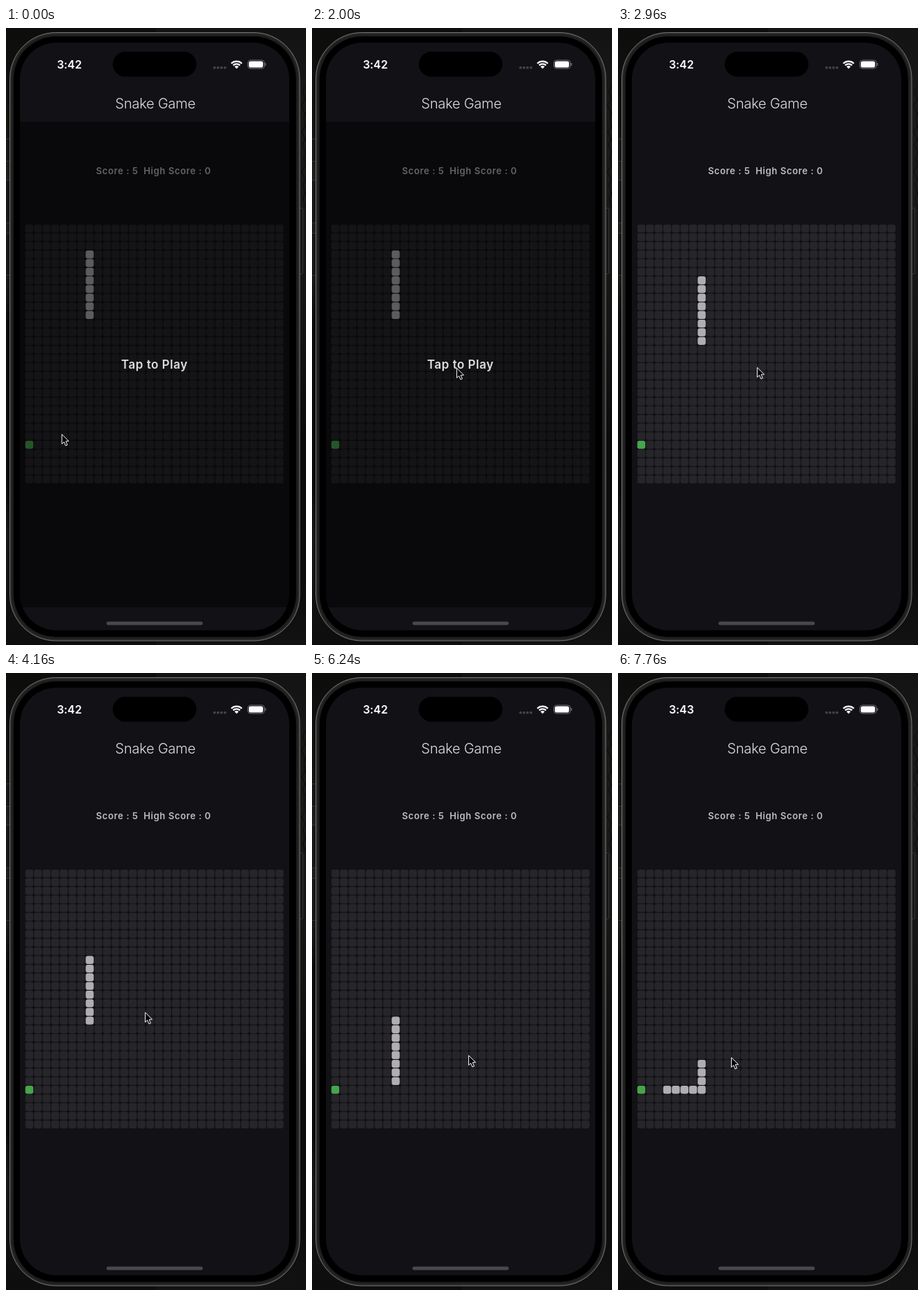
An HTML page with a canvas that plays this animation: 430x882 px, repeating every 8 s.

```html
<!DOCTYPE html>
<html lang="en">
<head>
<meta charset="utf-8">
<title>Snake Game</title>
<style>
  html, body { margin: 0; width: 100%; height: 100%; overflow: hidden; background: #0c0c0c; }
  canvas { display: block; }
</style>
</head>
<body>
<canvas id="stage" width="430" height="882"></canvas>
<script>
const ctx = document.getElementById('stage').getContext('2d');
const LOOP = 8000, TICK = 80;
const FONT = 'Inter, "Open Sans", sans-serif';

const GRID = { x: 27.7, y: 280.9, n: 30, pitch: 12.367, size: 11.4, radius: 3 };
const FOOD = [0, 25];
const LENGTH = 8;
const PLAY_AT = 2080, MINUTE_AT = 6640;

// Moments at which the snake advances one cell.
const STEPS = [2400, 2720, 2960, 3280, 3520, 3840, 4160, 4480, 4720, 5040,
  5360, 5600, 5920, 6240, 6560, 6800, 7120, 7440, 7760];

// Pointer rests and moves: time, x, y.
const POINTER = [[0, 79.5, 580], [880, 217, 481], [1200, 207, 485.5], [2240, 207, 485.5],
  [2480, 199, 484.5], [4400, 199, 484.5], [5200, 224, 546], [6400, 224, 546], [6880, 162, 549]];

function box(x, y, w, h, r, fill, stroke) {
  ctx.beginPath();
  ctx.roundRect(x, y, w, h, r);
  if (fill) { ctx.fillStyle = fill; ctx.fill(); }
  if (stroke) { ctx.strokeStyle = stroke; ctx.lineWidth = 1; ctx.stroke(); }
}

function label(str, x, y, size, weight, color, spacing) {
  ctx.font = `${weight} ${size}px ${FONT}`;
  ctx.letterSpacing = spacing + 'px';
  ctx.fillStyle = color;
  ctx.fillText(str, x, y);
}

function cell(col, row, color) {
  const { x, y, pitch, size, radius } = GRID;
  box(x + col * pitch, y + row * pitch, size, size, radius, color);
}

function strip(x, w, stops) {
  const g = ctx.createLinearGradient(0, 0, 0, 882);
  stops.forEach(([at, color]) => g.addColorStop(at, color));
  ctx.fillStyle = g;
  ctx.fillRect(x, 0, w, 882);
}

function backdrop() {
  strip(0, 215, [[0, '#0d0d0c'], [0.15, '#12120f'], [0.25, '#20201c'], [0.4, '#1a1a17'],
    [0.48, '#0a0a0a'], [0.75, '#0b0b0b'], [0.82, '#171716'], [1, '#0d0d0d']]);
  strip(215, 215, [[0, '#131313'], [0.15, '#1a1a19'], [0.3, '#191918'], [0.5, '#141413'],
    [0.66, '#0b0b0b'], [0.9, '#0c0c0c'], [1, '#121212']]);
  ctx.strokeStyle = '#0b0b0b';
  ctx.lineWidth = 1;
  ctx.beginPath();
  for (let i = 0; i < 9; i++) {
    const y = 82 + i * 19;
    ctx.moveTo(430, y);
    ctx.lineTo(425 - 2 * Math.sin(i * 2.3), y + 9);
    ctx.lineTo(430, y + 22 + 4 * Math.sin(i));
  }
  ctx.stroke();
}

function phone() {
  [[158, 32], [217, 61], [293, 60]].forEach(([y, h]) => box(-3, y + 0.5, 9, h, 1, '#171717', '#353535'));
  box(418, 257.5, 7.5, 94, 1.5, '#171717', '#353535');
  box(5.5, 6.5, 415.5, 869.5, 66, '#2a2a2b', '#767676');
  box(8, 9, 410.5, 864.5, 63, '#1e1e1f');
  box(10.8, 12, 405, 858.5, 61, '#000');
  box(20, 21, 386, 840, 52, '#121116');
  box(153, 34, 120, 35.5, 17.75, '#000');
}

function wifi(cx, cy) {
  const from = -Math.PI * 0.75, to = -Math.PI * 0.25;
  ctx.strokeStyle = ctx.fillStyle = '#fff';
  ctx.lineWidth = 2.3;
  [10.7, 6.9].forEach(r => {
    ctx.beginPath();
    ctx.arc(cx, cy, r, from, to);
    ctx.stroke();
  });
  ctx.beginPath();
  ctx.moveTo(cx, cy);
  ctx.arc(cx, cy, 4.2, from, to);
  ctx.fill();
}

function statusBar(t) {
  label(t < MINUTE_AT ? '3:42' : '3:43', 73, 58, 16, 600, '#fff', -0.1);
  for (let i = 0; i < 4; i++) box(297 + i * 5, 54.8, 3.8, 3.8, 1.9, '#454448');
  wifi(330.5, 58.3);
  box(346.5, 46, 24, 12, 4, null, '#6f6e72');
  box(348, 47.5, 20.5, 9, 2.8, '#fff');
  box(371.3, 50, 1.3, 4, 0.6, '#6f6e72');
}

function cellAt(i) {
  // The route runs down column 7, then turns left along row 25.
  return i <= 25 ? [7, i] : [32 - i, 25];
}

function board(t) {
  for (let row = 0; row < GRID.n; row++)
    for (let col = 0; col < GRID.n; col++) cell(col, row, '#262529');
  cell(...FOOD, '#47a54b');
  const tail = 3 + STEPS.filter(s => s <= t).length;
  for (let i = 0; i < LENGTH; i++) cell(...cellAt(tail + i), '#b0aeb2');
}

function pointer(t) {
  let k = POINTER.length - 1;
  while (POINTER[k][0] > t) k--;
  const a = POINTER[k], b = POINTER[k + 1] || a;
  const p = b === a ? 0 : (t - a[0]) / (b[0] - a[0]);
  const e = p * p * (3 - 2 * p);
  ctx.save();
  ctx.translate(a[1] + (b[1] - a[1]) * e, a[2] + (b[2] - a[2]) * e);
  ctx.beginPath();
  [[0.6, 0.8], [0.6, 14.6], [3.7, 11.7], [5.9, 17], [8.4, 16], [6.2, 10.8], [10.5, 10.6]]
    .forEach(([x, y]) => ctx.lineTo(x, y));
  ctx.closePath();
  ctx.fillStyle = '#000';
  ctx.fill();
  ctx.strokeStyle = '#fff';
  ctx.lineWidth = 1;
  ctx.stroke();
  ctx.restore();
}

function draw(t) {
  backdrop();
  phone();
  statusBar(t);
  label('Snake Game', 156.5, 115, 20, 300, '#dedde0', -0.25);
  label('Score : 5  High Score : 0', 129, 209, 13, 600, '#bebdc0', 0.6);
  board(t);
  if (t < PLAY_AT) {
    ctx.fillStyle = 'rgba(0,0,0,0.48)';
    ctx.fillRect(20, 134, 386, 694);
    label('Tap to Play', 165, 487, 17, 600, '#dddcde', 0.5);
  }
  box(144, 848.5, 138, 5, 2.5, '#49484b');
  pointer(t);
}

function frame(now) {
  draw(Math.floor((now % LOOP) / TICK) * TICK);
  requestAnimationFrame(frame);
}
requestAnimationFrame(frame);
</script>
</body>
</html>
```
